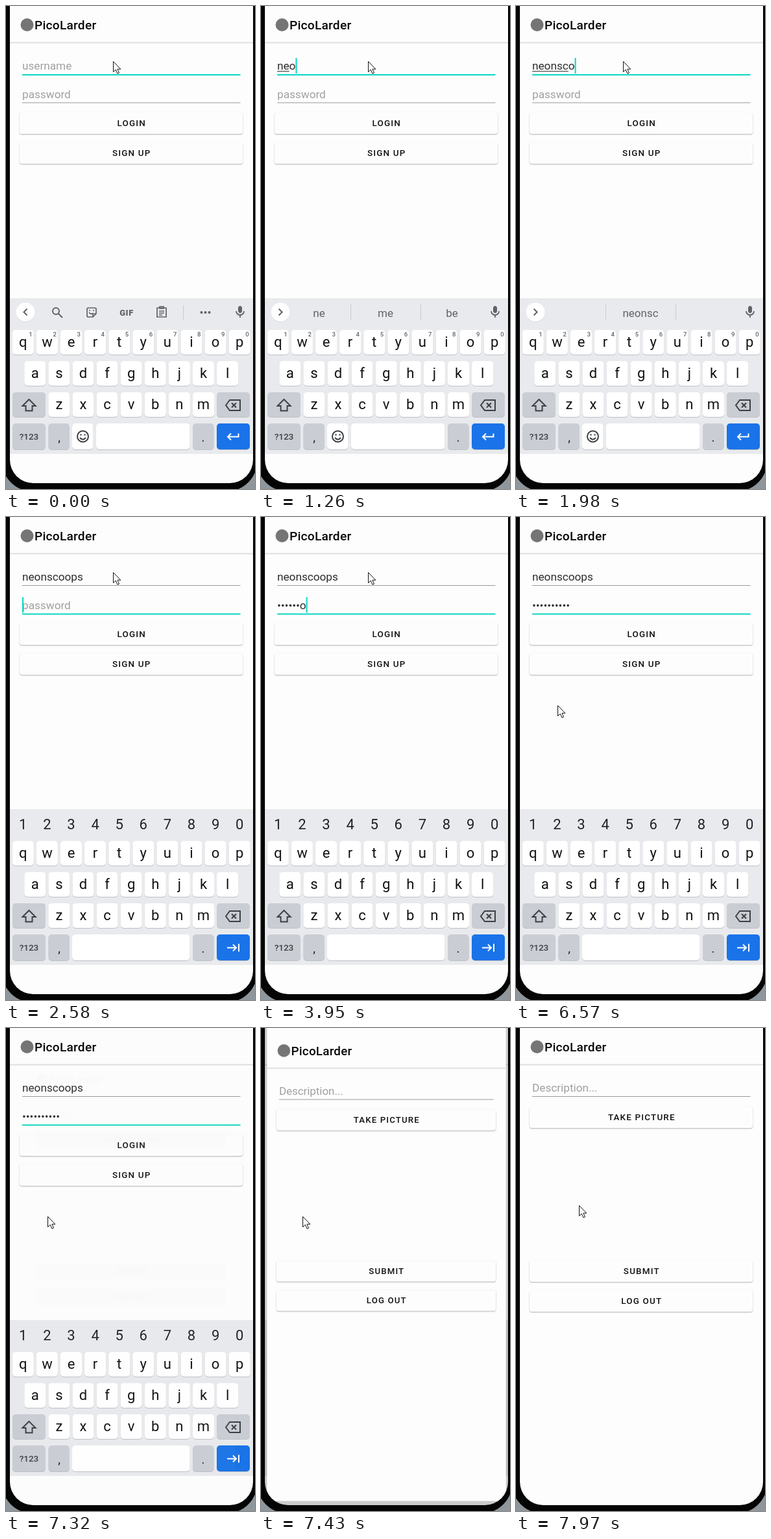
These frames come from a looping animation (384x744 px, 8 s). An HTML page with a canvas:

```html
<!DOCTYPE html>
<html lang="en">
<head>
<meta charset="utf-8">
<title>Sign up</title>
<style>
html, body { margin: 0; width: 384px; height: 744px; overflow: hidden; }
canvas { display: block; }
</style>
</head>
<body>
<canvas width="384" height="744"></canvas>
<script>
const c = document.querySelector('canvas').getContext('2d');
const LOOP = 8000, OPEN = 7320, OPEN_END = 7790;
const TEAL = '#0ad6c2', GREY = '#5f6368', PAPER = '#fdfdfd';
const NAME = 'neonscoops', DOT = '•';
const FIELD_FONT = '17.2px Roboto, sans-serif';
const nameTimes = [1020, 1140, 1260, 1470, 1690, 1860, 1980, 2160, 2250, 2340];
const passTimes = [2950, 3130, 3250, 3460, 3710, 3860, 3950, 4190, 4300, 4400];
const FOCUS_PASS = 2520, MASK_LAST = 5870;
const mousePath = [
  [4900, 165, 85], [5480, 180, 222], [5670, 180, 222], [5970, 71, 310],
  [6280, 71, 310], [6570, 64, 290], [7925, 64, 290], [7970, 97, 273]
];
const hints = [
  [], ['n', 'no', 'be'], ['ne', 'me', 'be'], ['ne', 'me', 'be'],
  ['neo', 'neon', 'newest'], ['neon', 'neons', 'neonates'], ['neons', 'neon', 'necklaces']
];

const clamp = v => Math.max(0, Math.min(1, v));
const count = (times, t) => times.filter(at => at <= t).length;
const within = (t, from, to) => t >= from && t < to;

function rect(x, y, w, h, color) {
  c.fillStyle = color;
  c.fillRect(x, y, w, h);
}

function round(x, y, w, h, r, color) {
  c.fillStyle = color;
  c.beginPath();
  c.roundRect(x, y, w, h, r);
  c.fill();
}

function disc(x, y, r, color) {
  round(x - r, y - r, 2 * r, 2 * r, r, color);
}

function text(s, x, y, font, color, align = 'center', spacing = 0) {
  c.font = font;
  c.fillStyle = color;
  c.textAlign = align;
  c.letterSpacing = spacing + 'px';
  c.fillText(s, x, y);
}

function icon(d, x, y, color = GREY, width = 2, fill) {
  const path = new Path2D(d);
  c.save();
  c.translate(x, y);
  if (fill) { c.fillStyle = fill; c.fill(path); }
  c.strokeStyle = color;
  c.lineWidth = width;
  c.stroke(path);
  c.restore();
}

function appBar() {
  rect(6, 55, 375, 1, '#eeeeee');
  rect(6, 56, 375, 1.5, '#dfdfdf');
  disc(32.5, 29, 10, '#757575');
  text('PicoLarder', 44, 36, '500 19.1px Roboto, sans-serif', '#080808', 'left', 0.24);
}

function button(label, y) {
  c.save();
  c.shadowColor = 'rgba(0,0,0,.3)';
  c.shadowBlur = 2;
  c.shadowOffsetY = 1;
  round(21, y, 344, 33, 3.5, PAPER);
  c.restore();
  text(label, 193.8, y + 21.2, '500 13.4px Roboto, sans-serif', '#101010', 'center', 1.2);
}

function field(value, hint, y, focused, caret) {
  text(value || hint, 25, y - 7, FIELD_FONT, value ? '#2c2c2c' : '#a0a0a0', 'left');
  if (focused) rect(25, y, 336.5, 2, TEAL);
  else rect(25, y, 336.5, 1, '#999');
  if (caret) rect(25 + c.measureText(value).width, y - 25, 2, 24, TEAL);
}

function loginPage(t) {
  rect(6, 0, 375, 735, PAPER);
  appBar();
  const onPass = t >= FOCUS_PASS;
  const n = count(nameTimes, t), p = count(passTimes, t);
  field(NAME.slice(0, n), 'username', 105, !onPass,
    within(t, 280, 740) || within(t, 1020, FOCUS_PASS));
  if (n > 1 && !onPass) rect(25, 100, c.measureText(NAME.slice(0, n - 1)).width, 1, '#333');

  const masked = t < MASK_LAST ? Math.max(0, p - 1) : p;
  field(DOT.repeat(masked) + NAME.slice(masked, p), 'password', 148.5, onPass,
    within(t, FOCUS_PASS, 4900) || within(t, 5400, 5900));
  button('LOGIN', 164);
  button('SIGN UP', 210);
  if (within(t, 5670, 5970)) {
    const glow = 0.1 * Math.sin(Math.PI * (t - 5670) / 300);
    round(21, 210, 344, 33, 3.5, `rgba(0,0,0,${glow})`);
  }
  keyboard(t >= 2580, n);
}

function key(x, y, w, color = '#fff', h = 38) {
  round(x, y + 1, w, h, 5, '#bdc0c6');
  round(x, y, w, h, 5, color);
}

function toolbar() {
  icon('M3 -2A5 5 0 1 1 -7 -2A5 5 0 1 1 3 -2M1.7 1.7L8 8', 79, 472);
  icon('M-7 -5Q-7 -7 -5 -7H5Q7 -7 7 -5V2L2 7H-5Q-7 7 -7 5ZM7 2H2V7M-4 -3H-2M2 -3H4M-4 0Q-1 4 2 1', 132, 472, GREY, 1.7);
  text('GIF', 186, 477, '900 13px Roboto, sans-serif', GREY, 'center', 0.6);
  icon('M-7 -6H7V8H-7ZM-3 -8H3V-5H-3ZM-4 -1H4M-4 2H4M-4 5H1', 240, 471, GREY, 1.7);
  rect(273, 461, 1, 22, '#c8cacd');
  for (const x of [301.5, 307.5, 313.5]) disc(x, 472, 2, GREY);
}

function suggestions(n) {
  const words = hints[n] || ['', NAME.slice(0, n - 1), ''];
  words.forEach((word, i) =>
    text(word, 89.5 + 102.5 * i, 479, '17px Roboto, sans-serif', GREY));
  rect(138, 460, 1, 23, '#c8cacd');
  rect(246, 460, 1, 23, '#c8cacd');
}

function keyboard(secure, n) {
  const PITCH = 37.1, DARK = '#cacdd4', font = '22px Roboto, sans-serif';
  rect(6, 450, 375, 240, '#e8eaed');
  if (!secure) {
    disc(30, 472.5, 14.5, '#d8dadd');
    disc(30, 471.5, 14.5, '#fff');
    icon(n ? 'M-2.5 -5L2.5 0L-2.5 5' : 'M2.5 -5L-2.5 0L2.5 5', 30, 471.5);
    if (n) suggestions(n); else toolbar();
    icon('M-2.5 -6A2.5 2.5 0 0 1 2.5 -6V-1A2.5 2.5 0 0 1 -2.5 -1Z', 361, 471, GREY, 1, GREY);
    icon('M-6 -1A6 6 0 0 0 6 -1M0 5V9', 361, 471, GREY, 1.8);
  }
  ['qwertyuiop', 'asdfghjkl', 'zxcvbnm'].forEach((row, r) => {
    const y = 499 + 48 * r;
    [...row].forEach((letter, i) => {
      const x = [26.3, 44.8, 81.9][r] + PITCH * i;
      key(x - 16.5, y, 33);
      text(letter, x, y + 26, font, '#111');
      if (r) return;
      const digit = String((i + 1) % 10);
      if (secure) text(digit, x, 481, font, '#202124');
      else text(digit, x + 11.7, 509, '500 9.5px Roboto, sans-serif', GREY);
    });
  });
  key(10, 595, 51, DARK);
  icon('M0 -9L10 1H5V8.5H-5V1H-10Z', 35.5, 615, '#3c4043');
  key(325, 595, 51, DARK);
  icon('M-11 0L-5 -8H11V8H-5ZM-2 -3.5L5 3.5M5 -3.5L-2 3.5', 350, 615, '#3c4043');

  key(10, 643, 51, DARK, 40);
  text('?123', 35.5, 668, '500 13.5px Roboto, sans-serif', '#3c4043');
  key(65.5, 643, 32.5, DARK, 40);
  text(',', 82, 671, '19px Roboto, sans-serif', '#202124');
  if (secure) key(102, 643, 181.5, '#fff', 40);
  else {
    key(102, 643, 32.5, '#fff', 40);
    icon('M8.5 0A8.5 8.5 0 1 1 -8.5 0A8.5 8.5 0 1 1 8.5 0M-4.2 -2.5H-1.8M1.8 -2.5H4.2M-4.5 2Q0 7.5 4.5 2', 118.5, 663, '#3c4043');
    key(139, 643, 144.5, '#fff', 40);
  }
  key(288, 643, 32.5, DARK, 40);
  text('.', 304, 671, '19px Roboto, sans-serif', '#202124');
  key(325, 643, 51, '#1a73e8', 40);
  icon(secure ? 'M-9 0H5M0 -5L5 0L0 5M9 -6V6' : 'M8.5 -5V0H-8M-3 -5L-8 0L-3 5', 350, 663.5, '#fff');
}

function postPage(t) {
  const p = clamp((t - OPEN) / (OPEN_END - OPEN));
  const scale = 1 - 0.15 * (1 - p) ** 8;
  rect(0, 0, 384, 744, `rgba(0,0,0,${0.2 * clamp((t - OPEN) / 80)})`);
  c.save();
  c.globalAlpha = clamp((t - OPEN) / 50);
  c.translate(193.5, 369);
  c.scale(scale, scale);
  c.translate(-193.5, -369);
  rect(6, -20, 375, 755, PAPER);
  appBar();
  field('', 'Description...', 105, false, false);
  button('TAKE PICTURE', 121);
  button('SUBMIT', 358);
  button('LOG OUT', 404);
  c.restore();
}

function mouse(t) {
  let [, x, y] = mousePath[0];
  for (let i = 1; i < mousePath.length; i++) {
    const [t0, x0, y0] = mousePath[i - 1], [t1, x1, y1] = mousePath[i];
    if (t < t0) break;
    const p = clamp((t - t0) / (t1 - t0)), e = p * p * (3 - 2 * p);
    x = x0 + (x1 - x0) * e;
    y = y0 + (y1 - y0) * e;
  }
  icon('M0 0V16L3.8 12.6L6.4 18.6L9 17.5L6.4 11.7H11.3Z',
    Math.round(x) + 0.5, Math.round(y) + 0.5, '#111', 1, '#fff');
}

function draw() {
  const t = performance.now() % LOOP;
  rect(0, 0, 384, 744, '#8f979c');
  round(-7, -60, 395, 808, 49, '#050505');
  c.save();
  c.beginPath();
  c.roundRect(6, -60, 375, 795, 36);
  c.clip();
  if (t < OPEN_END) loginPage(t);
  if (t >= OPEN) postPage(t);
  c.restore();
  mouse(t);
  requestAnimationFrame(draw);
}
draw();
</script>
</body>
</html>
```
